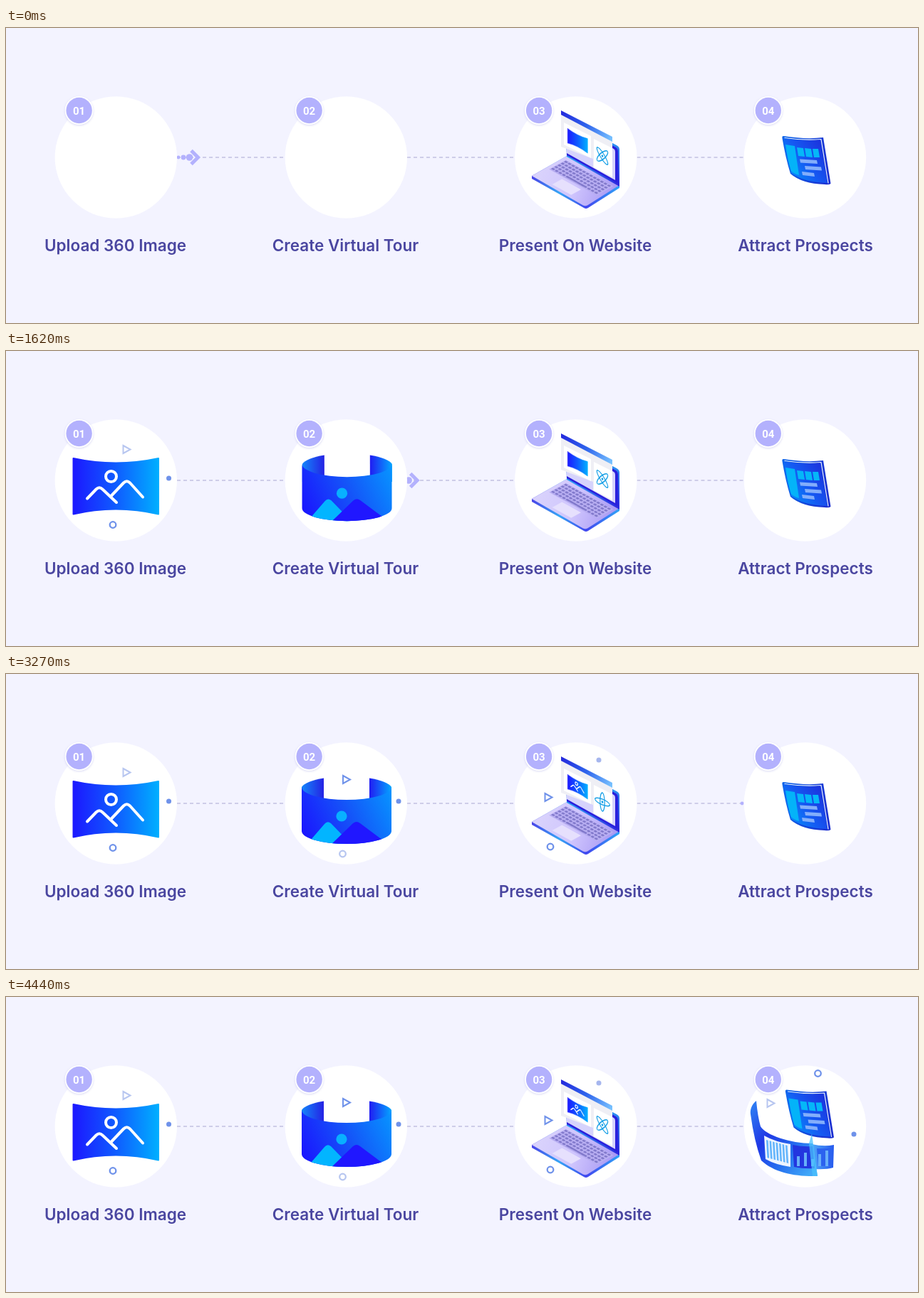
Recreate the animation shown at these times as an HTML page with a canvas. Size 1280 by 415 pixels, loop 4470 ms.

```html
<!DOCTYPE html>
<html lang="en">
<head>
<meta charset="utf-8">
<title>Four steps</title>
<style>
  html, body { margin: 0; width: 100%; height: 100%; overflow: hidden; background: #f3f3ff; }
  canvas { display: block; width: 1280px; height: 415px; }
</style>
</head>
<body>
<canvas id="stage" width="1280" height="415"></canvas>
<script>
const ctx = document.getElementById('stage').getContext('2d');
const LOOP = 4470, STEP = 30, MID = 182, R = 85.7;
const LILAC = '#b3b1fd', BLUE = '#6f92ea', PALE = '#b7c6f0';
const steps = [
  { x: 154.3, title: 'Upload 360 Image', tx: 153.5 },
  { x: 477.3, title: 'Create Virtual Tour', tx: 476.5 },
  { x: 799.8, title: 'Present On Website', tx: 799 },
  { x: 1121.5, title: 'Attract Prospects', tx: 1122 }
];

const clamp = v => Math.max(0, Math.min(1, v));
const span = (t, from, to) => clamp((t - from) / (to - from));
const easeOut = p => 1 - (1 - p) ** 3;
const easeInOut = p => p * p * (3 - 2 * p);

function layer(draw) {
  ctx.save();
  draw();
  ctx.restore();
}

function gradient(x0, y0, x1, y1, ...colors) {
  const g = ctx.createLinearGradient(x0, y0, x1, y1);
  colors.forEach((c, i) => g.addColorStop(i / (colors.length - 1), c));
  return g;
}

function fill(path, color) {
  ctx.fillStyle = color;
  ctx.fill(new Path2D(path));
}

function stroke(path, color, width) {
  ctx.strokeStyle = color;
  ctx.lineWidth = width;
  ctx.lineCap = ctx.lineJoin = 'round';
  ctx.stroke(new Path2D(path));
}

function disc(x, y, r, color) {
  ctx.beginPath();
  ctx.arc(x, y, r, 0, 7);
  ctx.fillStyle = color;
  ctx.fill();
}

function clipDisc(x) {
  ctx.beginPath();
  ctx.arc(x, MID, R, 0, 7);
  ctx.clip();
}

// Small floating ornaments, scaled in around their own centre.
function pop(x, y, p, draw) {
  if (p <= 0) return;
  layer(() => {
    ctx.translate(x, y);
    ctx.scale(p, p);
    draw();
  });
}
const triangle = (x, y, p, color) => pop(x, y, p, () => {
  ctx.lineJoin = 'miter';
  ctx.strokeStyle = color;
  ctx.lineWidth = 2;
  ctx.stroke(new Path2D('M-4.5-5.5L5.5 0L-4.5 5.5Z'));
});
const dot = (x, y, p, color) => pop(x, y, p, () => disc(0, 0, 3.5, color));
const ring = (x, y, p, color) => pop(x, y, p, () => {
  ctx.beginPath();
  ctx.arc(0, 0, 4.3, 0, 7);
  ctx.strokeStyle = color;
  ctx.lineWidth = 2.3;
  ctx.stroke();
});

function connectors() {
  ctx.strokeStyle = '#aaa7d2';
  ctx.lineWidth = 1.2;
  ctx.setLineDash([5, 4]);
  for (let i = 0; i < 3; i++) {
    ctx.beginPath();
    ctx.moveTo(steps[i].x + R, MID);
    ctx.lineTo(steps[i + 1].x - R, MID);
    ctx.stroke();
  }
  ctx.setLineDash([]);
}

function arrow(t) {
  layer(() => {
    ctx.translate(242 + Math.max(0, t - 570) * 0.293, MID);
    disc(0, 0, 2.4, LILAC);
    disc(7, 0, 3.4, LILAC);
    disc(15.5, 0, 4.8, LILAC);
    ctx.strokeStyle = LILAC;
    ctx.lineWidth = 5;
    ctx.stroke(new Path2D('M18-9.5L27.5 0L18 9.5'));
  });
}

function badge(x, label) {
  layer(() => {
    ctx.shadowColor = 'rgba(150,150,220,.35)';
    ctx.shadowBlur = 3;
    ctx.shadowOffsetY = 1;
    disc(x, 116, 20, '#fff');
  });
  disc(x, 116, 18.2, LILAC);
  ctx.fillStyle = '#fff';
  ctx.font = '700 15px Roboto, sans-serif';
  ctx.fillText(label, x, 121.5);
}

// Concave picture with a line-drawn landscape; reveal and drawn run from 0 to 1.
function picture(reveal, drawn, weight) {
  if (reveal <= 0) return;
  layer(() => {
    ctx.beginPath();
    ctx.rect(92, 140, 125 * reveal, 100);
    ctx.clip();
    const shape = 'M94.5 151Q154 164 214 151V229.500Q154 215.500 94.500 229.500Z';
    const color = gradient(94, 0, 215, 0, '#1c18ff', '#0f5cff', '#00b0ff');
    fill(shape, color);
    stroke(shape, color, 2);
  });
  if (drawn <= 0) return;
  layer(() => {
    const trim = length => ctx.setLineDash([length * drawn, length]);
    trim(62);
    stroke('M114 207.500L126.500 194.500Q131 190 135.500 194.500L155 213', '#fff', weight);
    trim(68);
    stroke('M147 204.500L165 185.500Q169.500 181 174 185.500L192 205.500', '#fff', weight);
    trim(48);
    stroke('M155 176.500A7.500 7.500 0 1 1 140 176.500A7.500 7.500 0 1 1 155 176.500', '#fff', weight);
  });
}

function uploadStep(t) {
  picture(easeOut(span(t, 0, 330)), span(t, 180, 480), 4);
  const p = i => easeOut(span(t, 330 + i * 40, 480 + i * 40));
  triangle(169, 138.5, p(0), PALE);
  dot(228.5, 179, p(1), BLUE);
  ring(150, 244.500, p(2), BLUE);
}

function panorama() {
  const front = 'M415 159A63 18 0 0 0 541 159V221A63 18 0 0 1 415 221Z';
  fill(front, gradient(415, 225, 541, 165, '#1a14ff', '#1552f8', '#0794ff'));
  layer(() => {
    ctx.clip(new Path2D(front));
    fill('M422 240L447 211Q451 206 456 210L485 240Z', '#02b5ff');
    fill('M452 244L487 210Q492 206 497 210L537 240V250H452Z', '#2017ff');
    disc(471, 200, 7.6, '#08b0ff');
  });
}

function panoramaBack() {
  fill('M415 159A63 18 0 0 1 446 146.500V184H415Z', gradient(415, 0, 446, 0, '#1485fa', '#2522e4'));
  fill('M541 159A63 18 0 0 0 510 146.500V184H541Z', gradient(510, 0, 541, 0, '#211cf2', '#03a6ff'));
}

function tourStep(t) {
  const away = 1 - easeOut(span(t, 1100, 1700));
  if (away < 1) {
    layer(() => {
      clipDisc(steps[1].x);
      if (away > 0.01) ctx.filter = `blur(${away * 8}px)`;
      layer(() => {
        ctx.translate(355 * away, -10 * away);
        panoramaBack();
      });
      ctx.translate(228 * away, 66 * away);
      panorama();
    });
  }
  const p = i => easeOut(span(t, 1680 + i * 60, 1860 + i * 60));
  triangle(477.500, 148.500, p(0), BLUE);
  dot(551, 179, p(1), BLUE);
  ring(472.500, 253, p(2), PALE);
}

function keyboard() {
  layer(() => {
    // Unit square of the laptop base: along the hinge, then toward the viewer.
    ctx.transform(74, 41, -49, 27, 787, 181);
    ctx.fillStyle = '#b9aff2';
    ctx.fillRect(0.05, 0.1, 0.9, 0.48);
    for (let row = 0; row < 5; row++) {
      for (let col = 0; col < 13; col++) {
        const space = row === 4 && col > 3 && col < 9;
        ctx.fillStyle = '#8179cb';
        ctx.fillRect(0.06 + col * 0.068, 0.12 + row * 0.092, space ? 0.068 : 0.047, 0.054);
      }
    }
    ctx.fillStyle = '#e6e0fd';
    ctx.fillRect(0.34, 0.65, 0.36, 0.28);
  });
}

function orbitIcon(angle) {
  layer(() => {
    ctx.transform(0.8, 0.32, 0, 1, 837, 180);
    ctx.rotate(angle);
    ctx.strokeStyle = '#159fe6';
    ctx.lineWidth = 1.5;
    for (const turn of [0, Math.PI / 2]) {
      ctx.beginPath();
      ctx.ellipse(0, 0, 13, 4, turn, 0, 7);
      ctx.stroke();
    }
    disc(0, 0, 1.7, '#159fe6');
  });
}

function laptop(t) {
  const edge = gradient(738, 210, 861, 235, '#4a44e8', '#35a5f5', '#4247ef', '#2ea9f8');
  fill('M738 208L787 180L861 221V225L817 253Q814 255 811 253L738 212Z', edge);
  fill('M738 208L787 180L861 221L816 249.500Q813 251 810 249.500Z',
    gradient(750, 200, 850, 235, '#d9d2fc', '#cfc5fd', '#a99af4'));
  keyboard();

  // Screen behind the floating page.
  fill('M786 127L857 165Q861 167 861 171V223L787 181Z', gradient(835, 165, 862, 220, '#2c9df4', '#2e28df'));
  fill('M786 130L856 168Q859 170 859 173V219L787 179Z', '#2a20dc');
  fill('M786 133L853 170Q855 171 855 174V214L787 176Z', '#d6d3fc');

  fill('M779 121L851 159V211L824 196V184L779 167Z', '#efeff5');
  fill('M779 116L851 153V160L779 122Z', gradient(779, 116, 851, 156, '#2427dc', '#2e63ec', '#79c3ff'));
  fill('M783 133L821 152V183L783 164Z', '#fff');
  fill('M825 156L851 169V209L825 196Z', '#fff');

  const drawn = t < 3000 ? span(t, 1950, 2500) : t < 3750 ? 1 - span(t, 3330, 3600) : span(t, 3900, 4300);
  layer(() => {
    ctx.transform(0.2346, 0.119, 0, 0.261, 766.07, 90.72);
    picture(1, drawn, 5);
  });
  orbitIcon(-Math.PI / 4 * (1 + span(t, 2100, 3270) + Math.max(0, t - 3270) / 1170));
}

function websiteStep(t) {
  laptop(t);
  const p = i => easeOut(span(t, 2760 + i * 60, 2940 + i * 60));
  triangle(761, 173.500, p(0), BLUE);
  ring(764, 243, p(1), BLUE);
  dot(832, 121, p(2), '#a6b6ee');
}

function card() {
  fill('M1091 152Q1123 157 1147 154L1157.500 219Q1155 221 1149 220Q1117 219 1101 205Q1094 182 1089.500 155Q1089 152 1091 152Z',
    gradient(1090, 180, 1158, 190, '#0b62e8', '#1b2ed0'));
  stroke('M1093 154.500Q1120 158.500 1144 156.500L1154 218', '#eef4ff', 1.2);
  fill('M1091 155Q1119 160 1143 157.500L1153 218Q1120 217 1102 204Q1095 183 1091 155Z',
    gradient(1090, 205, 1150, 165, '#0497fa', '#1559f2', '#1c31dc'));
  fill('M1094 164L1107 166L1113 207Q1106 205 1102 201Q1097 185 1094 164Z', '#04b3f8');
  const cyan = '#05b7f8';
  fill('M1110 168L1119 169L1121 181L1112 180ZM1121 169L1130 170L1132 182L1123 181ZM1132 170L1140 170L1142 182L1134 182Z', cyan);
  const bar = '#83aefb';
  fill('M1114 184.500L1138 186L1139 191L1115 189.500ZM1121 194L1144 195.500L1145 200.500L1122 199ZM1117 202L1134 204L1135 209L1118 207Z', bar);
}

function filmStrip() {
  fill('M1131 207Q1148 211 1162 208L1161 240Q1151 243 1134 242Z',
    gradient(1131, 0, 1162, 0, '#51a9f8', '#2559ee'));
  fill('M1053 146C1047 151 1044 158 1045 165Q1050 202 1060 230C1078 247 1108 253 1139 252L1132 206C1100 206 1066 194 1059 182Q1055 168 1053 146Z',
    gradient(1045, 160, 1139, 235, '#2d79f2', '#2038e5', '#256fef', '#41a9f8'));
  fill('M1064 195Q1080 204 1101 207V239Q1080 236 1066 228Z', '#edf5ff');
  for (let i = 0; i < 7; i++) {
    const x = 1067 + i * 4.5, y = 201 + i * 1.2;
    fill(`M${x} ${y}l2.600 .8l1.500 25l-2.600-.8Z`, '#62b4fb');
  }
  fill('M1104 208Q1118 211 1132 210L1135 241Q1120 242 1106 239Z', '#2336df');
  fill('M1138 213Q1150 214 1160 212L1159 236Q1150 238 1140 238Z', '#2b62ef');
  [224, 219, 228, 221, 216].forEach((y, i) => {
    const x = 1110 + i * 10;
    fill(`M${x} ${y}h4V238h-4Z`, '#67aff9');
  });
  fill('M1131 192L1139 252H1132L1127 206Z', 'rgba(75,194,252,.75)');
}

function prospectsStep(t) {
  const p = easeInOut(span(t, 3270, 3660));
  layer(() => {
    ctx.translate(4.500 * p, -21.500 * p);
    card();
  });
  if (p > 0) {
    layer(() => {
      ctx.beginPath();
      ctx.rect(1040, 140, 126 * p, 120);
      ctx.clip();
      filmStrip();
    });
  }
  const q = i => easeOut(span(t, 3840 + i * 80, 4020 + i * 80));
  triangle(1073, 149.500, q(0), PALE);
  ring(1139.500, 107.500, q(1), BLUE);
  dot(1190, 193, q(2), BLUE);
}

function render(t) {
  ctx.fillStyle = '#f3f3ff';
  ctx.fillRect(0, 0, 1280, 415);
  connectors();
  arrow(t);
  ctx.textAlign = 'center';
  steps.forEach(({ x, title, tx }) => {
    disc(x, MID, R, '#fff');
    ctx.fillStyle = '#4a46a0';
    ctx.font = '600 22.5px Inter, sans-serif';
    ctx.fillText(title, tx, 314);
  });
  uploadStep(t);
  tourStep(t);
  websiteStep(t);
  prospectsStep(t);
  steps.forEach(({ x }, i) => badge(x - 51.7, '0' + (i + 1)));
}

const start = performance.now();
function tick() {
  const t = (performance.now() - start) % LOOP;
  render(Math.floor(t / STEP) * STEP);
  requestAnimationFrame(tick);
}
tick();
</script>
</body>
</html>
```
